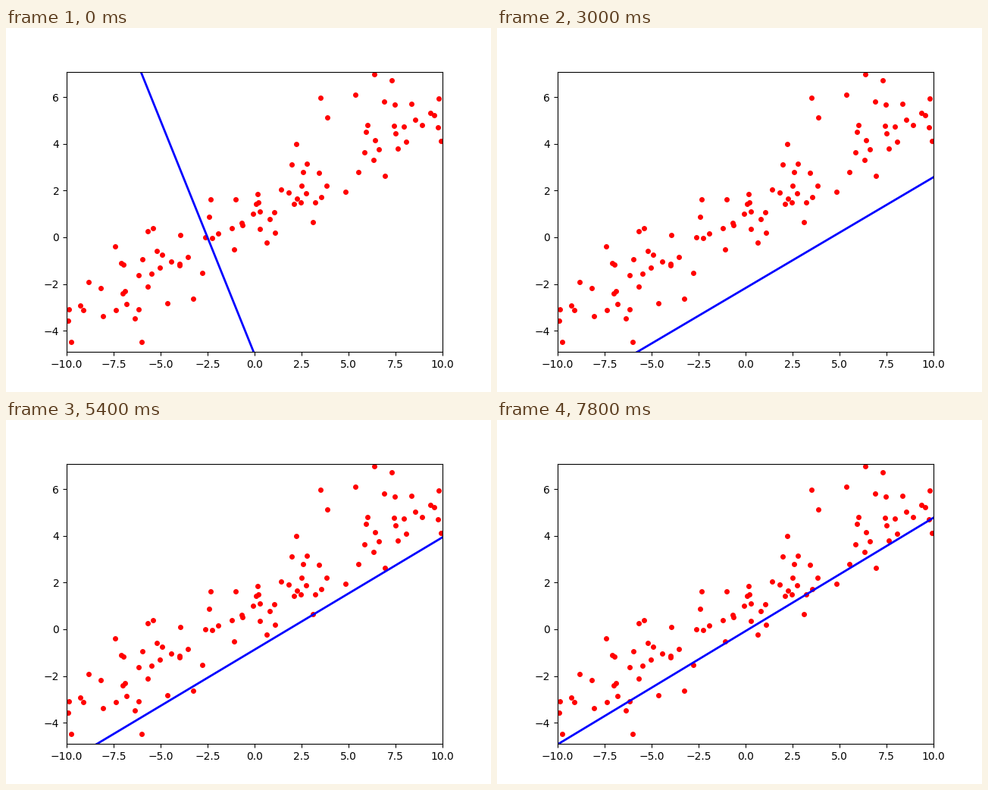
A matplotlib script that plays this animation: 640 by 480 pixels, repeating every 8 s.

```python
import numpy as np
import matplotlib.pyplot as plt
from matplotlib.animation import FuncAnimation

FRAMES, STEP_MS = 40, 200
XLIM, YLIM = (-10, 10), (-4.91, 7.09)
COUNT = 100

# Dots standing clear of the cloud
OUTLIERS = np.array([
    (-7.40, -0.38), (-6.00, -4.48), (-5.40, 0.40), (-3.27, -2.62),
    (-2.34, 1.63), (-1.00, 1.63), (0.66, -0.23), (2.22, 4.00),
    (3.12, 0.65), (3.49, 5.97), (3.87, 5.13), (5.36, 6.09),
    (6.00, 4.80), (6.37, 6.99), (7.30, 6.72), (9.76, 4.72)])


def samples():
    """Noisy points along a rising trend, followed by the outliers."""
    rng = np.random.default_rng(7)
    x = rng.uniform(*XLIM, COUNT - len(OUTLIERS))
    y = 0.48 * x + 1.1 + rng.normal(0, 0.85, x.size)
    return np.vstack([np.column_stack([x, y]), OUTLIERS])


def coefficients(step):
    """Slope and intercept after some steps of gradient descent."""
    gap = 6.195 * 0.96 ** step              # slow mode: intercept creeps up
    swing = -2.46 * (-0.336) ** step        # fast mode: slope rings and settles
    return 0.4915 - 0.005 * gap + swing, 1.185 - gap


fig, ax = plt.subplots(figsize=(6.4, 4.8), dpi=100)
ax.set_xlim(*XLIM)
ax.set_ylim(*YLIM)
ax.plot(*samples().T, "ro", markersize=4)

ends = np.array(XLIM)
line, = ax.plot([], [], "b", linewidth=2)


def update(step):
    slope, intercept = coefficients(step)
    line.set_data(ends, slope * ends + intercept)
    return line,


anim = FuncAnimation(fig, update, frames=FRAMES, interval=STEP_MS,
                     repeat=True, repeat_delay=0)
plt.show()
```
